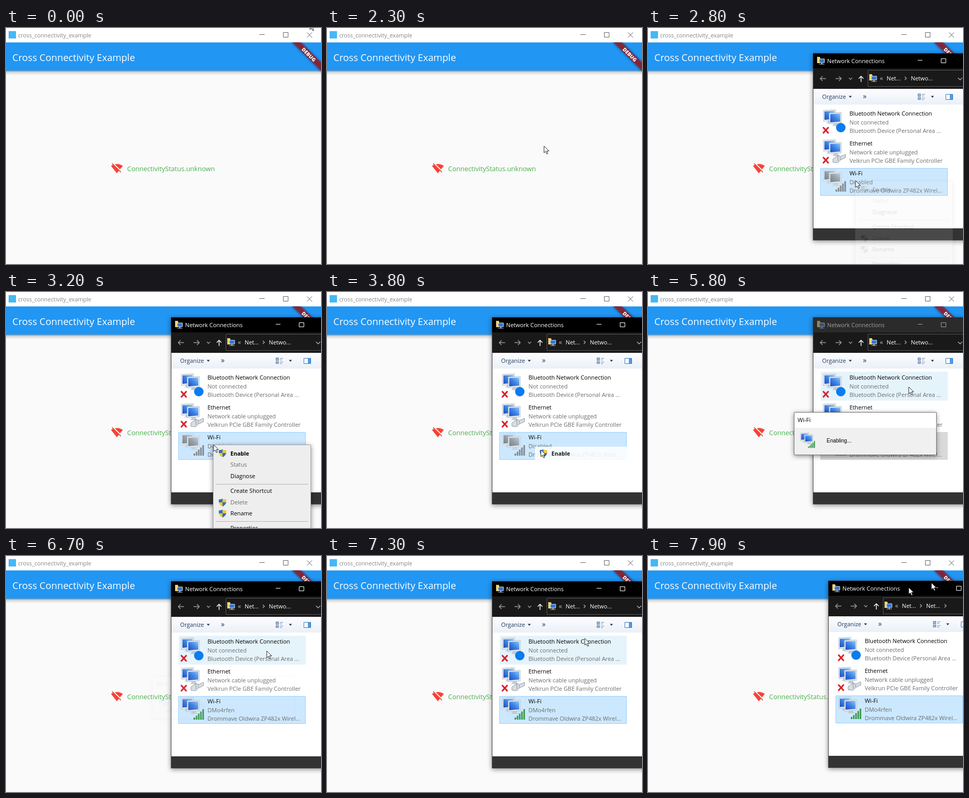
These frames come from a looping animation (598 by 450 pixels, 8000 ms). An HTML page:

```html
<!DOCTYPE html>
<html lang="en">
<head>
<meta charset="utf-8">
<title>Connectivity demo</title>
<style>
html, body { margin: 0; width: 100%; height: 100%; overflow: hidden; background: #fafafa; }
svg { display: block; width: 598px; height: 450px; }
text { font: 10.87px "Open Sans", "Noto Sans", sans-serif; white-space: pre; }
.dim { fill: #6d6d6d; }
.line { fill: none; stroke-width: 1; }
.bold { fill: none; stroke-width: 1.4; }
.off { filter: grayscale(1) opacity(.65); }

/* Every part shares one 8 s clock that ticks in 100 ms steps: 1.25% each */
.a { animation: 8s step-end infinite; }
.late { opacity: 0; }

#win { opacity: 0; animation-name: win; }
@keyframes win {
  30% { opacity: .5; transform: translate(18px, 9px) scale(.96); }
  31.25% { opacity: 1; transform: none; }
  96.25% { opacity: 1; transform: translate(4px, 0); }
  97.5% { opacity: 1; transform: translate(14px, 0); }
  98.75% { opacity: 1; transform: translate(29px, -1px); }
}
#bar { animation-name: bar; }
@keyframes bar { 51.25% { fill: #2b2b2b; } 81.25% { fill: #000; } }
#caption { animation-name: caption; }
@keyframes caption { 51.25% { opacity: .55; } 81.25% { opacity: 1; } }

#pick { animation-name: pick; }
@keyframes pick {
  33.75% { opacity: 1; fill: #cce8ff; stroke: #99d1ff; }
  51.25% { opacity: 1; fill: #d9d9d9; stroke: #d9d9d9; }
  81.25% { opacity: 1; fill: #cce8ff; stroke: #99d1ff; }
}
#count { animation-name: show; }
@keyframes show { 33.75% { opacity: 1; } }
#hover { animation-name: hover; }
@keyframes hover { 66.25% { opacity: 1; } 92.5% { opacity: 0; } }

#down { animation-name: down; }
@keyframes down { 80% { opacity: 0; } }
#up { animation-name: up; }
@keyframes up { 80% { opacity: 1; } }
#long { animation-name: long; }
@keyframes long { 97.5% { opacity: 0; } }
#short { animation-name: short; }
@keyframes short { 97.5% { opacity: 1; } }

#menu { animation-name: menu; }
@keyframes menu {
  35% { opacity: .12; } 36.25% { opacity: .55; } 37.5% { opacity: 1; }
  46.25% { opacity: .4; } 47.5% { opacity: 0; }
}
#enable { animation-name: enable; }
@keyframes enable {
  35% { opacity: .2; } 36.25% { opacity: .55; } 37.5% { opacity: 1; }
  47.5% { opacity: .86; } 48.75% { opacity: .4; } 50% { opacity: 0; }
}
#lit { animation-name: lit; }
@keyframes lit { 41.25% { opacity: 1; } }

#dialog { animation-name: dialog; }
@keyframes dialog {
  55% { opacity: .5; } 56.25% { opacity: 1; }
  81.25% { opacity: .6; } 82.5% { opacity: .2; } 83.75% { opacity: .04; } 85% { opacity: 0; }
}

#busy { animation-name: busy; }
@keyframes busy { 55% { opacity: 1; } 62.5% { opacity: 0; } }
#arc { transform-origin: 442px 275px; animation: turn 1s steps(10) infinite; }
@keyframes turn { to { transform: rotate(360deg); } }

#cursor { animation-name: move, blink; }
@keyframes move {
  0% { transform: translate(577px, -10px); }
  1.25% { transform: translate(577px, -2px); }
  2.5% { transform: translate(412px, 225px); }
  30% { transform: translate(412px, 225px); animation-timing-function: steps(3); }
  33.75% { transform: translate(394px, 291px); }
  40% { transform: translate(394px, 291px); animation-timing-function: steps(4); }
  45% { transform: translate(406px, 301px); }
  52.5% { transform: translate(406px, 301px); animation-timing-function: steps(2); }
  55% { transform: translate(442px, 275px); }
  62.5% { transform: translate(442px, 275px); animation-timing-function: steps(4); }
  67.5% { transform: translate(495px, 181px); }
  90% { transform: translate(495px, 181px); animation-timing-function: steps(5); }
  96.25% { transform: translate(466px, 61px); }
  97.5% { transform: translate(480px, 61px); }
  98.75% { transform: translate(495px, 60px); }
}
@keyframes blink {
  2.5% { opacity: 0; } 28.75% { opacity: 1; } 55% { opacity: 0; } 62.5% { opacity: 1; }
}
#trail { animation-name: trail; }
@keyframes trail { 98.75% { opacity: 1; } }
</style>
</head>
<body>
<svg viewBox="0 0 598 450" xmlns="http://www.w3.org/2000/svg">
  <defs>
    <linearGradient id="screen" x1="1" y1="0" x2="0" y2="1">
      <stop offset="0" stop-color="#8ec8fa"/>
      <stop offset=".5" stop-color="#3f83e4"/>
      <stop offset="1" stop-color="#1c4cc0"/>
    </linearGradient>
    <linearGradient id="tools" x1="0" y1="0" x2="0" y2="1">
      <stop offset="0" stop-color="#fdfdfe"/>
      <stop offset="1" stop-color="#eaf0f8"/>
    </linearGradient>
    <linearGradient id="drop" x1="0" y1="0" x2="0" y2="1">
      <stop offset="0" stop-opacity=".42"/>
      <stop offset=".35" stop-opacity=".14"/>
      <stop offset="1" stop-opacity="0"/>
    </linearGradient>
    <filter id="shade" x="-20%" y="-20%" width="140%" height="140%">
      <feDropShadow dx="0" dy="2" stdDeviation="5" flood-opacity=".45"/>
    </filter>
    <filter id="soft" x="-20%" y="-60%" width="140%" height="220%">
      <feGaussianBlur stdDeviation="2.5"/>
    </filter>
    <clipPath id="appArea"><path d="M0 27.4H598V450H0z"/></clipPath>
    <g id="monitor">
      <path d="M8 20h8l1 4 4 2H5l3-2z" fill="#c3cbd4"/>
      <path d="M0 1 23 0V20L0 22z" fill="#e8edf2" stroke="#a9b5c2" stroke-width=".8"/>
      <path d="M2 3 21 2V17.5L2 19z" fill="url(#screen)"/>
    </g>
    <g id="pcs">
      <use href="#monitor" x="2" y="2"/>
      <use href="#monitor" x="13" y="7"/>
    </g>
    <path id="cross" d="M2 2 11 12M11 2 2 12" fill="none" stroke="#d8202c" stroke-width="3" stroke-linecap="round"/>
    <path id="bars" d="M0 16h3v4h-3zM4.2 12.5h3V20h-3zM8.4 8.5h3V20h-3zM12.6 4.5h3V20h-3zM16.8 0h3V20h-3z"/>
    <g id="place">
      <path d="M1 0h5l1 2v10H1z" fill="#f5d264"/>
      <path d="M5 4h10v7H5z" fill="#2d74d8" stroke="#dce8f4"/>
      <path d="M9 11.5h2v2h4v1H5v-1h4z" fill="#b9c6d2"/>
    </g>
    <g id="shield">
      <path d="M0 1.5Q4 1.5 7 0V7H0z" fill="#2672c8"/>
      <path d="M7 0q3 1.5 7 1.5V7H7z" fill="#f8c630"/>
      <path d="M0 7h7v8Q1 12 0 7z" fill="#f8c630"/>
      <path d="M7 7h7q-1 5-7 8z" fill="#2672c8"/>
    </g>
    <path id="arrow" d="M0 0V13L3 10.3 5.3 15.2 7.4 14.2 5.2 9.5H9.3z" fill="#fff" stroke="#111" stroke-width=".9"/>
  </defs>

  <!-- App -->
  <path d="M0 0H598V28H0z" fill="#fff"/>
  <path d="M5 6h14v14H5z" fill="#45b8f5"/>
  <text x="23" y="17.5" fill="#868686" style="font-size:10.8px">cross_connectivity_example</text>
  <path class="line" stroke="#666" d="M481 12.5h10M526.5 8.5h9v9h-9zM571.5 8.5l9.5 9.5M581 8.5l-9.5 9.5"/>
  <path d="M0 27.4H598V81.4H0z" fill="#2196f3"/>
  <path d="M0 81.4H598V90H0z" fill="url(#drop)"/>
  <text x="12" y="63" fill="#fff" style="font-size:18.2px">Cross Connectivity Example</text>
  <g clip-path="url(#appArea)">
    <g transform="translate(598 27.4) rotate(45)">
      <path d="M-40 27h80v11.5h-80z" filter="url(#soft)" opacity=".5"/>
      <path d="M-40 27h80v11.5h-80z" fill="#a01c28" opacity=".78"/>
      <text y="36.5" text-anchor="middle" fill="#fff" style="font-size:9.6px;font-weight:800">DEBUG</text>
    </g>
  </g>
  <path transform="translate(199 256.3) scale(.96)" fill="#f44336" d="M23.64 7c-.45-.34-4.93-4-11.64-4-1.5 0-2.89.19-4.15.48L18.18 13.8 23.64 7zm-6.6 8.22L3.27 1.44 2 2.72l2.05 2.06C1.91 5.76.59 6.82.36 7L12 21.5l3.91-4.87 3.32 3.32 1.27-1.27z"/>
  <text x="230" y="272.5" fill="#4caf50" style="font-size:12.6px">ConnectivityStatus.unknown</text>

  <!-- Network window -->
  <g id="win" class="a">
    <path d="M313 48H680V405H313z" fill="#444" filter="url(#shade)"/>
    <path id="bar" class="a" d="M313.5 48.5H680V77H313.5z"/>
    <g id="caption" class="a">
      <use href="#place" x="320" y="55"/>
      <text x="340" y="66.5" fill="#fff">Network Connections</text>
      <path class="line" stroke="#fff" d="M512 61.5h9M556.5 58.5h9v8h-9z"/>
    </g>
    <path d="M314 77H680V116H314z" fill="#191919"/>
    <path class="bold" stroke="#999" d="M338 96.5h-11m4.5-4.5-4.5 4.5 4.5 4.5M356 96.5h11m-4.5-4.5 4.5 4.5-4.5 4.5M381.5 95l3 3 3-3"/>
    <path class="bold" stroke="#fff" d="M404.5 103V92m-4.5 4.5 4.5-4.5 4.5 4.5"/>
    <path class="line" stroke="#555" d="M417.5 80.5H680V111.5H417.5z"/>
    <use href="#place" x="419" y="88"/>
    <g fill="#fff">
      <text x="440" y="99.5" fill="#bbb" style="font-size:12.5px">«</text>
      <text x="453" y="100">Net...</text>
      <path class="bold" stroke="#aaa" d="M487.5 93l3 3-3 3M588.5 95l4 4 4-4"/>
      <text id="long" class="a" x="499" y="100">Netwo...</text>
      <g id="short" class="a late">
        <text x="499" y="100">Net...</text>
        <path class="bold" stroke="#aaa" d="M534 93l3 3-3 3"/>
      </g>
    </g>
    <path d="M314 116H680V146H314z" fill="url(#tools)"/>
    <g fill="#1e395b">
      <text x="330.5" y="135">Organize</text>
      <text x="408" y="135" style="font-size:14px">»</text>
      <path d="M381 129.5h6l-3 3.5zM537 129.5h6l-3 3.5z"/>
    </g>
    <path d="M512.5 125.5h5v5h-5zM512.5 132.5h5v4h-5z" fill="#8fb4de" stroke="#6d7f96" stroke-width=".8"/>
    <path class="line" stroke="#7a8ca2" d="M520 126.5h6M520 129.5h4M520 133.5h6M520 136.5h4"/>
    <path d="M565.5 126.5h13v10h-13z" fill="#fff" stroke="#3d7ab8"/>
    <path d="M573 127h5v9h-5z" fill="#4c9be8"/>
    <path d="M314 146H680V382H314z" fill="#fff"/>

    <path id="hover" class="a late" d="M328 152H569V207H328z" fill="#e5f3fb"/>
    <use href="#pcs" x="331" y="154"/>
    <use href="#cross" x="331" y="188"/>
    <circle cx="366" cy="190" r="9" fill="#0a7cf0"/>
    <text x="382.5" y="167">Bluetooth Network Connection</text>
    <text class="dim" x="382.5" y="183.5">Not connected</text>
    <text class="dim" x="382.5" y="199.5">Bluetooth Device (Personal Area ...</text>

    <use href="#pcs" x="331" y="211"/>
    <use href="#cross" x="331" y="245"/>
    <path d="M351 250l9-7 5 2 10-4v6l-10 5-5 5-9-1z" fill="#d8dde2" stroke="#8b949d" stroke-width=".9"/>
    <path class="line" stroke="#8b949d" d="M360 243l1 11M365 246v5"/>
    <text x="382.5" y="224">Ethernet</text>
    <text class="dim" x="382.5" y="240.5">Network cable unplugged</text>
    <text class="dim" x="382.5" y="256.5">Velkrun PCIe GBE Family Controller</text>

    <path id="pick" class="a late" d="M327.5 267.5H568.5V319.5H327.5z"/>
    <g id="down" class="a">
      <use class="off" href="#pcs" x="331" y="268"/>
      <use href="#bars" x="356" y="292" fill="#858a90"/>
      <text class="dim" x="382.5" y="297.5">Disabled</text>
    </g>
    <g id="up" class="a late">
      <use href="#pcs" x="331" y="268"/>
      <use href="#bars" x="356" y="292" fill="#3c9a52"/>
      <text class="dim" x="382.5" y="297.5">DMo4rfen</text>
    </g>
    <text x="382.5" y="281">Wi-Fi</text>
    <text class="dim" x="382.5" y="313.5">Drommave Oldwira ZP482x Wirel...</text>

    <g fill="#fff">
      <text x="327" y="397.5">3 items</text>
      <path d="M373 388h1v11h-1z"/>
      <g id="count" class="a late">
        <text x="384" y="397.5">1 item selected</text>
        <path d="M470 388h1v11h-1z"/>
      </g>
      <path d="M587 388h3v3h-3zM587 392h3v3h-3zM587 396h3v3h-3zM592 389h5v1h-5zM592 393h5v1h-5zM592 397h5v1h-5z"/>
    </g>
    <path d="M314 382H680V404H314z" fill="#333" style="mix-blend-mode:darken"/>
  </g>

  <!-- Context menu -->
  <g id="menu" class="a late">
    <path d="M393.5 291.5H578.5V466H393.5z" fill="#eee" stroke="#a8a8a8" filter="url(#shade)"/>
    <path class="line" stroke="#b5b5b5" d="M398 366.5H574M398 437.5H574"/>
    <use href="#shield" x="404" y="394"/>
    <use href="#shield" x="404" y="415"/>
    <text class="dim" x="426" y="333">Status</text>
    <text x="426" y="354.5">Diagnose</text>
    <text x="426" y="383">Create Shortcut</text>
    <text class="dim" x="426" y="404.5">Delete</text>
    <text x="426" y="426">Rename</text>
    <text x="426" y="454">Properties</text>
  </g>
  <g id="enable" class="a late">
    <path id="lit" class="a late" d="M395 295H575V320H395z" fill="#fff"/>
    <use href="#shield" x="404" y="300"/>
    <text x="426" y="311.5" style="font-weight:700;font-size:10.6px">Enable</text>
  </g>

  <!-- Progress dialog -->
  <g id="dialog" class="a late">
    <path d="M277 229H547.5V311H277z" fill="#fff" filter="url(#shade)"/>
    <path d="M277 259H547V311H277z" fill="#f0f0f0"/>
    <path class="line" stroke="#777" d="M277.5 229.5H547.5V310.5H277.5z"/>
    <text x="284" y="248">Wi-Fi</text>
    <use href="#pcs" transform="translate(288 267) scale(.7)"/>
    <use href="#bars" transform="translate(304 284) scale(.66)" fill="#3c9a52"/>
    <text x="339" y="287" style="font:10px 'Liberation Sans',Arial,sans-serif">Enabling...</text>
  </g>

  <!-- Pointer -->
  <g id="busy" class="a late" fill="none">
    <circle cx="442" cy="275" r="5.7" stroke="#1c78c8" stroke-width="4"/>
    <path id="arc" d="M442 269.3a5.7 5.7 0 0 1 5.7 5.7" stroke="#5cb4f0" stroke-width="3"/>
  </g>
  <use id="trail" class="a late" href="#arrow" x="538" y="51"/>
  <use id="cursor" class="a" href="#arrow"/>
</svg>
</body>
</html>
```
